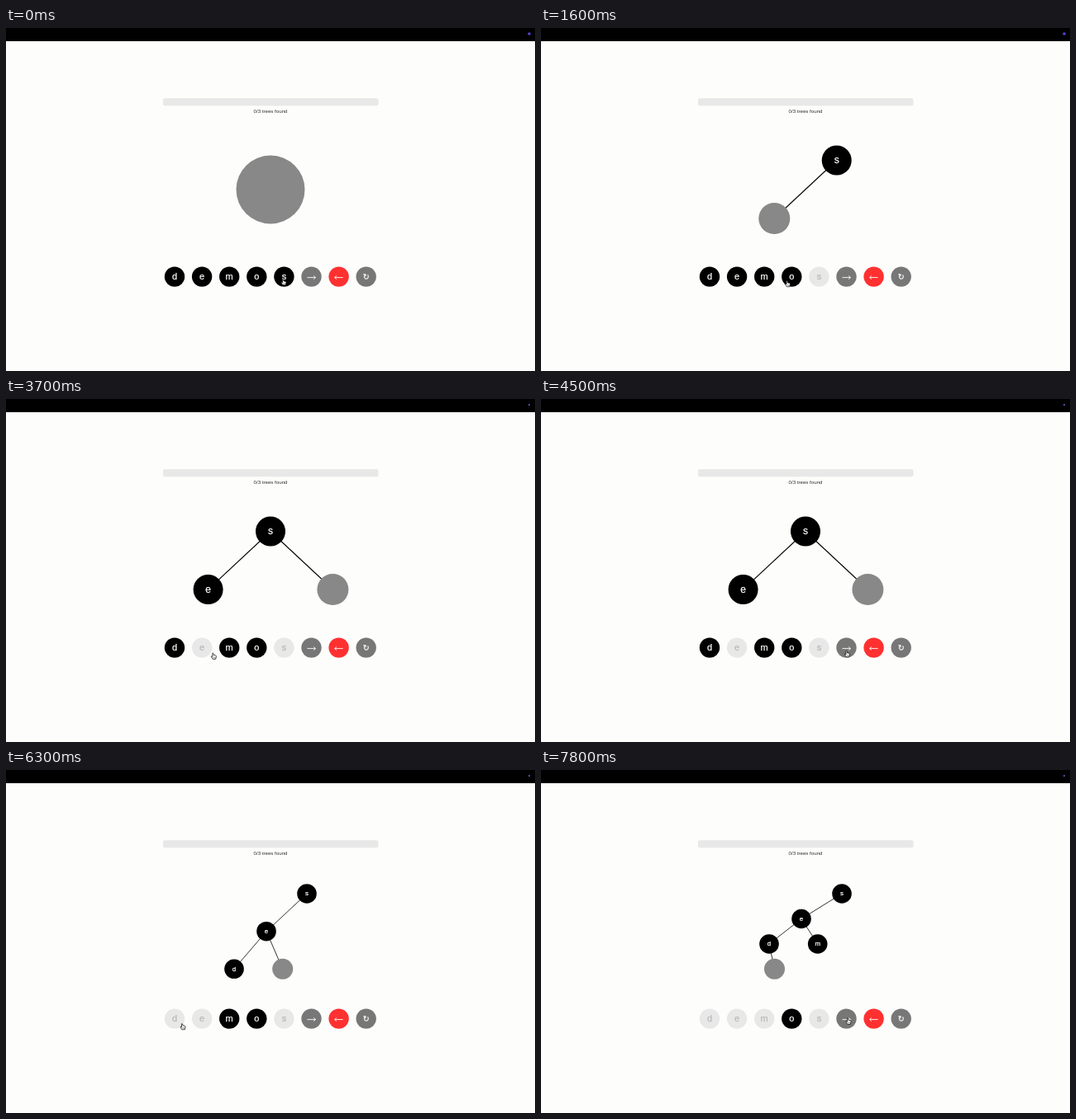
Write an HTML page that moves like this. It is 640 px wide and 416 px high and loops after 8000 ms.

```html
<!DOCTYPE html>
<html lang="en">
<head>
<meta charset="utf-8">
<title>Tree spelling</title>
<style>
  html, body { margin: 0; width: 100%; height: 100%; overflow: hidden; background: #fdfdfb; }
  svg { display: block; width: 640px; height: 416px; }
  text { font-family: "Liberation Sans", Arial, sans-serif; text-anchor: middle; }
</style>
</head>
<body>
<svg id="stage" viewBox="0 0 640 416"></svg>
<script>
const LOOP = 8000, STEP = 100;
const PAPER = '#fdfdfb', PALE = '#e8e8e8', SLOT = '#888888', GREY = '#777777', RED = '#ff3030';
const stage = document.getElementById('stage');

function add(parent, tag, attrs, label) {
  const el = document.createElementNS('http://www.w3.org/2000/svg', tag);
  for (const key in attrs) el.setAttribute(key, attrs[key]);
  if (label) el.textContent = label;
  return parent.appendChild(el);
}
const disc = (parent, x, y, r, fill) => add(parent, 'circle', { cx: x, cy: y, r, fill });
// The hairline stroke in the text colour gives the letters a slightly heavier weight
const letter = (parent, x, y, size, color, label) => add(parent, 'text', {
  x, y: y + size * 0.31, 'font-size': size, color,
  fill: 'currentColor', stroke: 'currentColor', 'stroke-width': 0.25
}, label);

// Page furniture
add(stage, 'rect', { width: 640, height: 416, fill: PAPER });
add(stage, 'rect', { width: 640, height: 16 });
const dot = add(stage, 'rect', { rx: 0.6 });
add(stage, 'rect', { x: 190, y: 85.3, width: 260.5, height: 9, rx: 2, fill: PALE });
add(stage, 'text', { x: 320, y: 103, 'font-size': 6.15, fill: '#303030' }, '0/3 trees found');

// Each tree: start time, radius, nodes as [label, x, y, parent index]; an empty label is the open slot
const trees = [
  { at: 0, r: 40.5, nodes: [['', 320, 196]] },
  { at: 900, r: 18, nodes: [['s', 357.7, 160.5], ['', 282.3, 231, 0]] },
  { at: 3700, r: 18, nodes: [['s', 320, 160.5], ['e', 244.6, 231, 0], ['', 395.4, 231, 0]] },
  { at: 4700, r: 11.8, nodes: [['s', 364, 150], ['e', 315, 195.7, 0], ['', 276, 241.3, 1]] },
  { at: 6300, r: 11.8, nodes: [['s', 364, 150], ['e', 315, 195.7, 0], ['d', 276, 241.3, 1], ['', 334.7, 241.3, 1]] },
  { at: 7000, r: 11.8, nodes: [['s', 364, 150], ['e', 315, 180.5, 0], ['d', 276, 211, 1], ['m', 334.7, 211, 1], ['', 282.5, 241.3, 2]] }
];
for (const tree of trees) {
  tree.group = add(stage, 'g', {});
  for (const [, x, y, up] of tree.nodes) {
    if (up === undefined) continue;
    const [, px, py] = tree.nodes[up];
    add(tree.group, 'line', {
      x1: px, y1: py, x2: x, y2: y, stroke: '#000', 'stroke-width': tree.r > 15 ? 1.1 : 0.8
    });
  }
  for (const [label, x, y] of tree.nodes) {
    disc(tree.group, x, y, label ? tree.r : tree.r + (tree.r > 15 ? 1 : 0.7), label ? '#000' : SLOT);
    if (label) letter(tree.group, x, y, tree.r * 0.67, PAPER, label);
  }
}

// Letter keys with the time each one is used up
const buttonX = i => 204 + i * 33.1, BUTTON_Y = 301.6, BUTTON_R = 12.2;
const keys = [['d', 6300], ['e', 3700], ['m', 7000], ['o', LOOP], ['s', 900]].map(([label, used], i) => ({
  used,
  disc: disc(stage, buttonX(i), BUTTON_Y, BUTTON_R, '#000'),
  text: letter(stage, buttonX(i), BUTTON_Y, 11, PAPER, label)
}));

function arrow(i, fill, dir) {
  const x = buttonX(i), y = BUTTON_Y + 1, tip = x + 5 * dir, back = tip - 2.3 * dir;
  disc(stage, x, BUTTON_Y, BUTTON_R, fill);
  add(stage, 'path', {
    d: `M${x - 5 * dir} ${y}H${tip}M${back} ${y - 2.1}L${tip} ${y}L${back} ${y + 2.1}`,
    fill: 'none', stroke: PAPER, 'stroke-width': 0.9
  });
}
arrow(5, GREY, 1);
arrow(6, RED, -1);
disc(stage, buttonX(7), BUTTON_Y, BUTTON_R, GREY);
letter(stage, buttonX(7), BUTTON_Y + 0.6, 9.5, PAPER, '↻').style.fontFamily = '"DejaVu Sans", sans-serif';

// Hand pointer, centred on its own origin
const hand = add(stage, 'g', {});
add(hand, 'path', {
  d: 'M-1.6 -3.2Q-.9 -3.8 -.4 -3L0 -1.1L2.4 -.6Q3.2 -.3 3 .9L2.3 3.8H-1.2L-3 1Q-3.1 0 -2.2 .3L-1.4 .9Z',
  fill: '#fff', stroke: '#000', 'stroke-width': 0.7, 'stroke-linejoin': 'round'
});
add(hand, 'path', { d: 'M-.2 1.2V2.7M.8 1.2V2.7M1.8 1.2V2.7', stroke: '#000', 'stroke-width': 0.35 });

// Pointer stops: time, x, y
const route = [
  [0, 336, 308], [900, 336, 308], [1100, 334.5, 313], [1200, 334.5, 313],
  [1600, 298.5, 310], [1850, 204, 316], [2100, 246, 312], [2600, 238.5, 310],
  [3600, 238.5, 310], [4000, 290, 316.5], [4500, 370.5, 309], [4600, 370.5, 309],
  [5100, 297.5, 314], [5500, 205, 311], [5700, 203, 308.5], [6200, 203, 308.5],
  [6500, 236, 316], [6800, 272.5, 308], [6900, 272.5, 308], [7350, 322, 313.5],
  [7800, 372, 304.5], [LOOP, 372, 304.5]
];
function pointerAt(t) {
  const i = route.findIndex(stop => stop[0] > t);
  const [t0, x0, y0] = route[i - 1], [t1, x1, y1] = route[i];
  const k = (t - t0) / (t1 - t0);
  return [x0 + (x1 - x0) * k, y0 + (y1 - y0) * k];
}

function draw(now) {
  const t = Math.floor((now % LOOP) / STEP) * STEP;
  trees.forEach((tree, i) => {
    const end = i + 1 < trees.length ? trees[i + 1].at : LOOP;
    tree.group.style.display = t >= tree.at && t < end ? '' : 'none';
  });
  for (const key of keys) {
    const used = t >= key.used;
    key.disc.setAttribute('fill', used ? PALE : '#000');
    key.text.setAttribute('color', used ? '#b9b9b4' : PAPER);
  }
  const lit = t < 2900, size = lit ? 3 : 2;
  dot.setAttribute('x', 633 - size / 2);
  dot.setAttribute('y', 7 - size / 2);
  dot.setAttribute('width', size);
  dot.setAttribute('height', size);
  dot.setAttribute('fill', lit ? '#5a48e0' : '#5c50b8');
  hand.setAttribute('transform', `translate(${pointerAt(t).join(' ')})`);
}

const start = performance.now();
function tick() {
  draw(performance.now() - start);
  requestAnimationFrame(tick);
}
tick();
</script>
</body>
</html>
```
